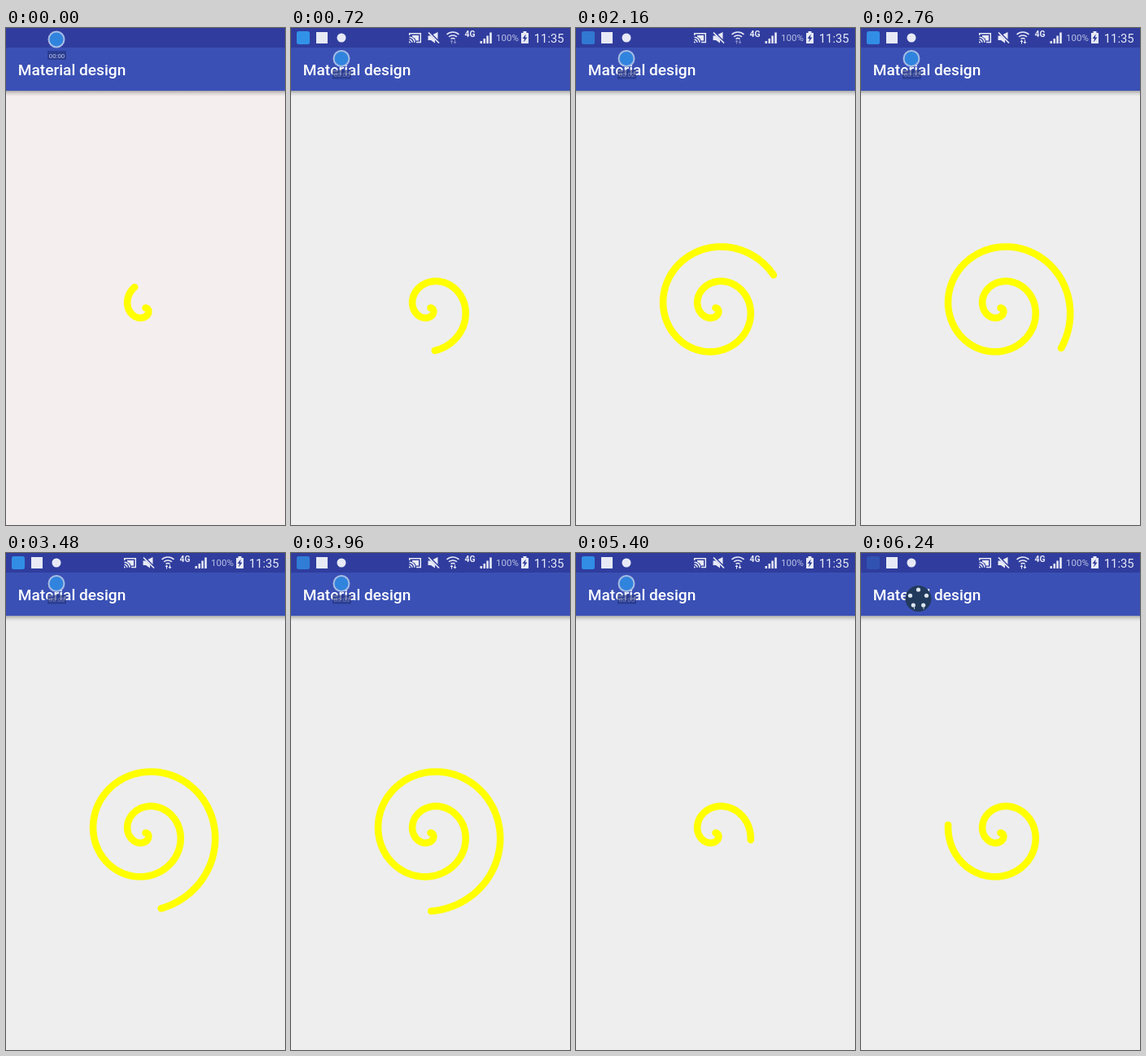
An HTML page that plays this animation: 343x610 px, repeating every 6.36 s.

```html
<!DOCTYPE html>
<html lang="en">
<head>
<meta charset="utf-8">
<title>Spiral</title>
<style>
  html, body { margin: 0; width: 100%; height: 100%; overflow: hidden; background: #eee; }
  svg { display: block; width: 343px; height: 610px; font-family: Roboto, sans-serif; }
</style>
</head>
<body>
<svg viewBox="0 0 343 610">
  <defs>
    <linearGradient id="shade" x2="0" y2="1">
      <stop offset="0" stop-opacity=".3"/>
      <stop offset=".45" stop-opacity=".11"/>
      <stop offset="1" stop-opacity="0"/>
    </linearGradient>
  </defs>
  <rect id="page" width="343" height="610" fill="#eee"/>
  <path id="spiral" fill="none" stroke-width="8.6" stroke-linecap="round" stroke-linejoin="round"/>

  <rect y="77" width="343" height="7" fill="url(#shade)"/>
  <rect width="343" height="77" fill="#3a50b5"/>
  <rect width="343" height="24" fill="#303d9e"/>
  <text x="14.8" y="58" font-size="19.1" font-weight="500" fill="#fff">Material design</text>

  <g id="status" fill="#e8eaf6">
    <rect id="badge" x="7" y="4" width="16" height="16" rx="2.5" fill="#3292e8"/>
    <rect x="31" y="5" width="14" height="14"/>
    <circle cx="62" cy="12" r="5.5"/>
    <g fill="none" stroke="#e8eaf6" stroke-width="1.5">
      <path d="M145.7 9V6.8H159.3V17.6H154M145.5 11.2A6.5 6.5 0 0 1 152 17.8M145.5 14.2A3.5 3.5 0 0 1 149 17.8"/>
      <path d="M169 5.5L182 18.5" stroke-width="1.7"/>
      <path d="M191.5 8A11 11 0 0 1 206.5 8M194 10.8A7.5 7.5 0 0 1 204 10.8M196.5 13.4A4 4 0 0 1 201.5 13.4"/>
    </g>
    <path d="M149 9H157V15.5H153.5Q152.500 12 149 10.500Z"/>
    <path d="M145 16.200A2 2 0 0 1 147 18.200H145Z"/>
    <path d="M168.500 9.500H172L177 14.500V18.500L172 15H168.500Z"/>
    <path d="M174.500 8L180.500 5V14Z"/>
    <path id="arrows" d="M195.500 17L197.500 14.500L199.500 17H198V19.500H197V17ZM199.500 17L201.500 19.500L203.500 17H202V14.500H201V17Z"/>
    <text x="213.500" y="11.400" font-size="10.300" font-weight="700">4G</text>
    <path d="M232.500 16H235V19H232.500ZM236.500 13H239V19H236.500ZM240.300 9.500H242.800V19H240.300ZM244.200 5.500H246.800V19H244.200Z"/>
    <text x="252" y="16.300" font-size="11.500" fill="#b9bfe3">100%</text>
    <path d="M283 6H285.500V4H289.500V6H292V19H283Z"/>
    <path d="M288.700 7.500L284.500 13H287L286 17.500L290.500 11.500H288Z" fill="#303d9e"/>
    <text x="298.800" y="17.600" font-size="14.800">11:35</text>
  </g>

  <g id="timer">
    <circle cx="62" cy="14" r="9.500" fill="#3184dd" stroke="#a9bde4" stroke-width="2"/>
    <rect x="51" y="28" width="23" height="11" fill="#24347f" opacity=".65"/>
    <text id="clock" x="62.500" y="36.500" font-size="7.800" text-anchor="middle" fill="#c5cae9">00:00</text>
  </g>
  <g id="menu" fill="#dce6ee">
    <circle cx="70.500" cy="56" r="16" fill="#223a5c"/>
    <path d="M65.500 63V69M77 63V69" stroke="#dce6ee" stroke-width=".8"/>
  </g>
</svg>
<script>
const LOOP = 6360, STEP = 120, CYCLE = 5000, RESTART = 4080;
const LEAD = CYCLE - RESTART;
const WHITE_FOR = 660;
const CX = 171.5, CY = 343.5, PITCH = 6.8, SWEEP = 4.5 * Math.PI;
const $ = id => document.getElementById(id);
const show = (id, on) => $(id).setAttribute("visibility", on ? "visible" : "hidden");

for (let i = 0; i < 5; i++) {
  const a = (i / 5 - 0.25) * 2 * Math.PI;
  const dot = document.createElementNS("http://www.w3.org/2000/svg", "circle");
  dot.setAttribute("cx", 70.5 + 10.5 * Math.cos(a));
  dot.setAttribute("cy", 55.5 + 10.5 * Math.sin(a));
  dot.setAttribute("r", 2.6);
  $("menu").append(dot);
}

function spiralPath(end) {
  const n = Math.max(1, Math.ceil(end / 0.06));
  let d = "";
  for (let i = 0; i <= n; i++) {
    const a = end * i / n, r = PITCH * a;
    d += (i ? "L" : "M") + (CX + r * Math.cos(a)).toFixed(2) + " " + (CY + r * Math.sin(a)).toFixed(2);
  }
  return d;
}

function render(t) {
  const intro = t < STEP;
  const age = intro ? LEAD - 105 : (t + LEAD) % CYCLE;
  const eased = 1 - (1 - age / CYCLE) ** 2;
  $("spiral").setAttribute("d", spiralPath(SWEEP * eased));
  $("spiral").setAttribute("stroke", age < WHITE_FOR ? "#f8fbff" : "#ff0");

  $("page").setAttribute("fill", intro ? "#f5eeee" : "#eee");
  show("status", !intro);
  const menuOpen = t >= 6120;
  show("timer", !menuOpen);
  show("menu", menuOpen);
  $("timer").setAttribute("transform", `translate(0 ${intro ? 0 : 23.5})`);
  $("clock").textContent = "00:0" + Math.floor(t / 1000);
  $("clock").setAttribute("opacity", intro ? 1 : 0.5);
  $("badge").setAttribute("opacity", menuOpen ? 0.25 : 0.85 + 0.15 * Math.cos((t - 720) / 960 * 2 * Math.PI));
  $("arrows").setAttribute("opacity", Math.floor(t / 360) % 2 ? 1 : 0.45);
}

const start = performance.now();
let last = -1;
function tick() {
  const t = (performance.now() - start) % LOOP;
  const step = Math.floor(t / STEP);
  if (step !== last) render((last = step) * STEP);
  requestAnimationFrame(tick);
}
tick();
</script>
</body>
</html>
```
